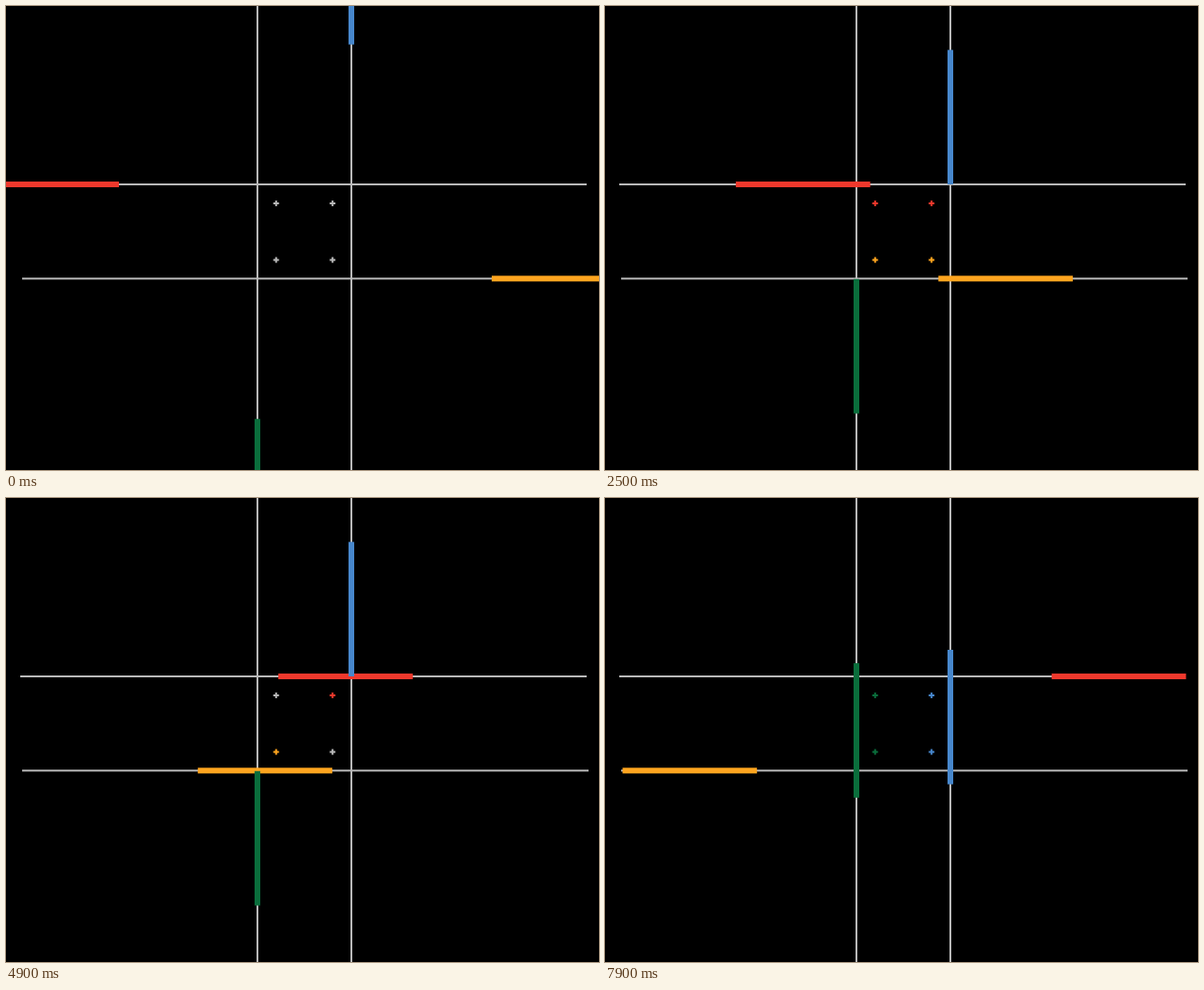
Write an HTML page with a canvas that moves like this. It is 625 px wide and 489 px high and loops after 8 s.

```html
<!DOCTYPE html>
<html lang="en">
<head>
<meta charset="utf-8">
<title>Crossing lanes</title>
<style>
html, body { margin: 0; width: 100%; height: 100%; overflow: hidden; background: #000; }
canvas { display: block; }
</style>
</head>
<body>
<canvas id="stage" width="625" height="489"></canvas>
<script>
const ctx = document.getElementById('stage').getContext('2d');
const LOOP = 8000, STEP = 100, LENGTH = 141.7;
const GRAY = '#b8b8b8', RED = '#f0382c', ORANGE = '#ffa51f', GREEN = '#0a6e3c', BLUE = '#4787cc';
const LEFT = 265, RIGHT = 364, TOP = 188, BOTTOM = 287.3;

// Key points of the red bar's left end: [time, x].
const PATH = [[0, -22.7], [700, 19], [1800, 97], [3300, 184.5], [6000, 357.5], [7700, 464], [7900, 470.7]];
const GO = 357; // red position at which the vertical bars move on

function redAt(t) {
  const i = Math.max(1, PATH.findIndex(([time]) => time >= t));
  const [t0, x0] = PATH[i - 1], [t1, x1] = PATH[i];
  return x0 + (x1 - x0) * (t - t0) / (t1 - t0);
}

function hBar(x, y, length, width, color) {
  ctx.fillStyle = color;
  ctx.fillRect(x, y - width / 2, length, width);
}

function vBar(x, y, length, width, color) {
  ctx.fillStyle = color;
  ctx.fillRect(x - width / 2, y, width, length);
}

function plus(x, y, color) {
  hBar(x - 3, y, 6, 2, color);
  vBar(x, y - 3, 6, 2, color);
}

function draw(t) {
  const red = redAt(Math.floor(t / STEP) * STEP);
  const orange = 489.2 - red;
  const blueEnd = Math.min(TOP, red + 63.3) + Math.max(0, red - GO);
  const greenTop = 475.8 - blueEnd;

  ctx.fillStyle = '#000';
  ctx.fillRect(0, 0, 625, 489);
  hBar(15, TOP, 597, 2, GRAY);
  hBar(17, BOTTOM, 597, 2, GRAY);
  vBar(LEFT, 0, 489, 2, GRAY);
  vBar(RIGHT, 0, 489, 2, GRAY);

  // Each corner shows which bar has claimed it.
  const entered = red + LENGTH >= LEFT;
  const passedFirst = red > LEFT;
  const passedAll = red > GO + 2;
  const owner = (first, next, isFar) =>
    passedAll ? next : entered && (isFar || !passedFirst) ? first : GRAY;
  plus(284.7, 208, owner(RED, GREEN, false));
  plus(344.2, 208, owner(RED, BLUE, true));
  plus(284.7, 267.6, owner(ORANGE, GREEN, true));
  plus(344.2, 267.6, owner(ORANGE, BLUE, false));

  hBar(red, TOP, LENGTH, 6, RED);
  hBar(orange, BOTTOM, LENGTH, 6, ORANGE);
  vBar(RIGHT, blueEnd - LENGTH, LENGTH, 6, BLUE);
  vBar(LEFT, greenTop, LENGTH, 6, GREEN);
}

const start = performance.now();
function tick() {
  draw((performance.now() - start) % LOOP);
  requestAnimationFrame(tick);
}
tick();
</script>
</body>
</html>
```
